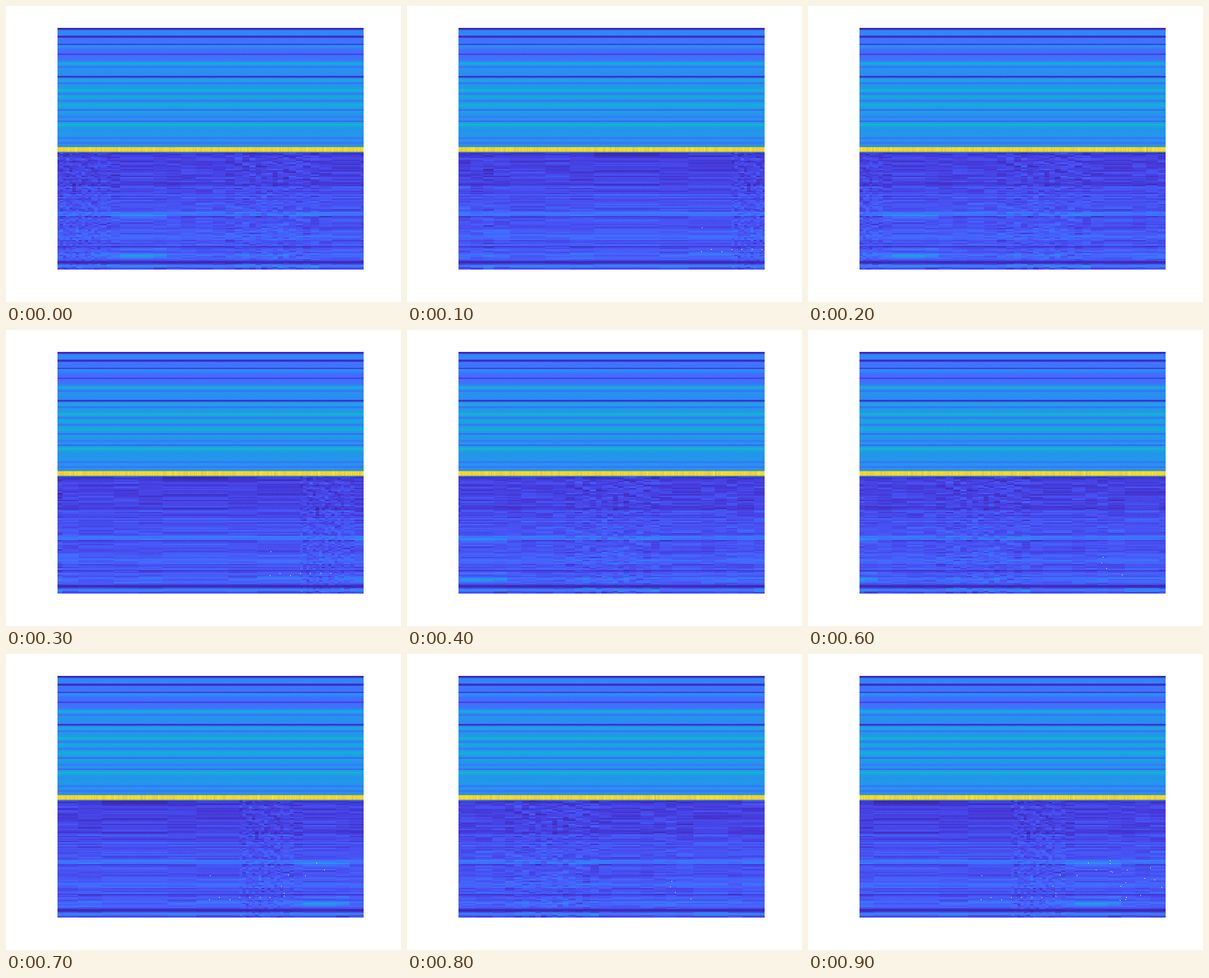
Animation, 560 px wide and 420 px high, one loop 1 s. Source, as a matplotlib script:

```python
import numpy as np
import matplotlib.pyplot as plt
from matplotlib.animation import FuncAnimation
from matplotlib.colors import LinearSegmentedColormap

WIDTH, HEIGHT, DPI = 560, 420, 100
LEFT, TOP, RIGHT, BOTTOM = 73, 31, 507, 374
VIEW_W, VIEW_H = RIGHT - LEFT, BOTTOM - TOP
LINE_Y = 200          # top of the bright line
FLOOR_Y = 208         # top of the blocky lower half
STRIP_W = 1000
STEP = 43.1           # scroll distance between neighbouring windows
CELL = 1.9            # height of one data row in the lower half

rng = np.random.default_rng(12)

PARULA = LinearSegmentedColormap.from_list("parula", [
    (0, (.2422, .1504, .6603)), (.07, (.2700, .2147, .8367)),
    (.143, (.2810, .3228, .9579)), (.214, (.2600, .4290, .9970)),
    (.286, (.1786, .5289, .9682)), (.429, (.0689, .6948, .8394)),
    (.571, (.2161, .7843, .5923)), (.714, (.6720, .7793, .2227)),
    (.857, (.9970, .7659, .2199)), (1, (.9769, .9839, .0805))], N=512)


def bands(y, centres, gain, width):
    """Sum of soft horizontal bands of equal strength."""
    offsets = (y[:, None] - np.array(centres)) / width
    return gain * np.exp(-offsets ** 2).sum(axis=1)


def data_rows(values, height):
    return values[(np.arange(height) / CELL).astype(int)]


def build_stripes():
    y = np.arange(TOP, LINE_Y)
    level = np.interp(y, [31, 38, 48, 75, 80, 130, 199],
                      [.26, .31, .23, .22, .31, .35, .34])
    level += bands(y, (57, 81, 119, 168), .1, 2.5)
    level += bands(y, (105, 129, 140), .06, 3)
    level -= bands(y, (32, 43, 100), .3, 1.6)
    level -= bands(y, (54, 147, 163), .22, .8)
    level -= bands(y, (68, 86, 109, 124, 134, 157, 187, 194), .13, 1.3)
    level += rng.normal(0, .012, len(y))
    part = np.repeat(level[:, None], STRIP_W, axis=1)
    part[13:] += rng.normal(0, .004, part[13:].shape)
    return part


def build_line():
    y = np.arange(LINE_Y, FLOOR_Y)
    level = np.interp(y, [200, 201, 203, 205, 206, 207],
                      [.76, .90, .89, .90, .72, .36])
    return level[:, None] + rng.normal(0, .03, STRIP_W)


def block_edges():
    """Columns grow and shrink as the recording slows down and speeds up."""
    steady = [17, 18, 15, 23, 50, 35, 34, 93, 41, 61]
    dense = [62 / 14] * 14
    settling = [9, 6, 13, 47, 19, 20, 21, 24, 18]
    dip = 7.6 + 5 * np.linspace(-1, 1, 14) ** 2
    closing = [18, 41, 19, 17, 15, 24, 49, 20, 38]
    widths = np.concatenate([steady, dense, settling, dip, closing])
    edges = np.append(0, np.cumsum(widths)).round().astype(int)
    return np.append(edges[edges < STRIP_W], STRIP_W)


def build_floor():
    y = np.arange(FLOOR_Y, BOTTOM)
    height = len(y)
    rows = int(height / CELL) + 1
    shared = np.interp(y, [208, 211, 250, 270, 350, 373],
                       [.03, .09, .11, .14, .15, .12])
    shared += bands(y, (294, 327, 354), .06, 4) + bands(y, [368.5], .16, 2)
    shared -= bands(y, [341], .08, 1) + bands(y, [363], .11, 2.5)
    shared += data_rows(rng.normal(0, .022, rows), height)
    spread = 1 - bands(y, [363], .8, 3) + bands(y, (354, 369), .4, 3)
    glow = bands(y, (298, 354), .13, 3) + bands(y, (344, 369), .07, 2)

    part = np.empty((height, STRIP_W))
    edges = block_edges()
    for x0, x1 in zip(edges, edges[1:]):
        sigma = .032 if x1 - x0 < 16 else .022
        noise = data_rows(rng.normal(0, sigma, rows), height) * spread
        warmth = np.exp(-(((x0 + x1) / 2 - 503) / 42) ** 4)
        part[:, x0:x1] = (shared + noise + glow * warmth)[:, None]
    return part + rng.normal(0, .004, part.shape)


def build_dots():
    """Single white gaps: a low row, a rising scatter and a late cluster."""
    low = [(x, rng.choice([345, 348])) for x in np.linspace(344, 430, 7)]
    scatter = zip(rng.uniform(440, 605, 22), rng.uniform(292, 350, 22))
    late = zip(rng.uniform(855, 893, 4), rng.uniform(315, 348, 4))
    return np.array([(345, 314), *low, *scatter, *late]).round().astype(int)


def window_index(frame):
    # Two passages of the recording alternate, both scrolling left.
    return frame // 2 if frame % 2 else 9 + frame // 2


def dot_range(index):
    if index < 9:
        return 0, 435 + 85 * max(0, index - 2)
    return (850, STRIP_W) if index >= 12 else (0, 0)


strip = PARULA(np.clip(np.vstack([build_stripes(), build_line(), build_floor()]),
                       0, 1))[..., :3]
dots = build_dots()


def view(frame):
    index = window_index(frame)
    start = round(STEP * index)
    picture = strip[:, start:start + VIEW_W].copy()
    first, last = dot_range(index)
    for x, y in dots:
        if first <= x < last and 0 <= x - start < VIEW_W:
            picture[y - TOP, x - start] = 1
    return picture


fig = plt.figure(figsize=(WIDTH / DPI, HEIGHT / DPI), dpi=DPI, facecolor="white")
ax = fig.add_axes([LEFT / WIDTH, 1 - BOTTOM / HEIGHT,
                   VIEW_W / WIDTH, VIEW_H / HEIGHT])
ax.axis("off")
image = ax.imshow(view(0), aspect="auto", interpolation="nearest")


def update(frame):
    image.set_data(view(frame))
    return [image]


animation = FuncAnimation(fig, update, frames=10, interval=100, repeat=True,
                          repeat_delay=0)
plt.show()
```
